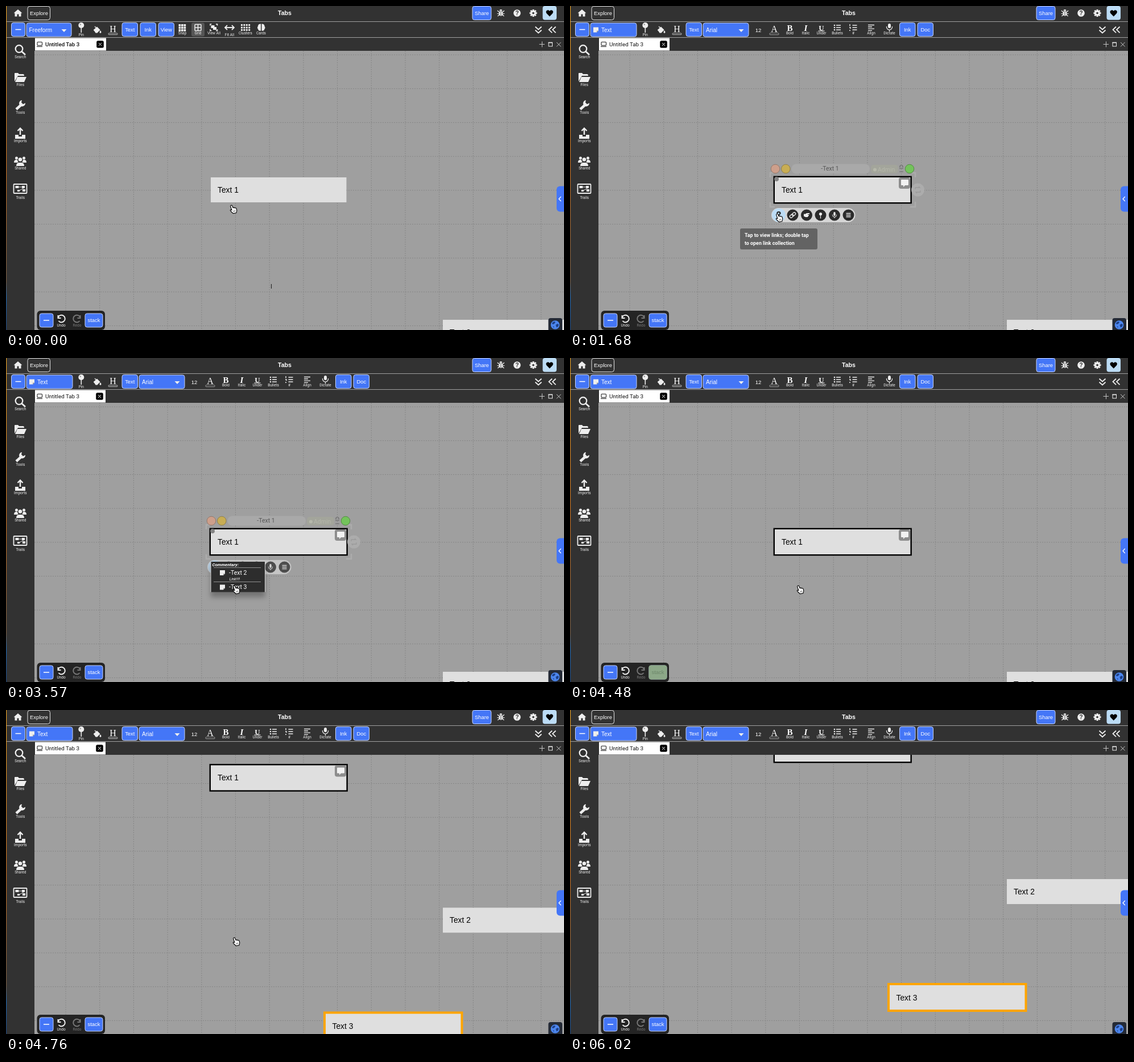
These frames come from a looping animation (981 px wide and 571 px high, 6930 ms). An HTML page:

```html
<!DOCTYPE html>
<html lang="en">
<head>
<meta charset="utf-8">
<title>Linked notes</title>
<style>
html, body { margin: 0; width: 100%; height: 100%; overflow: hidden; background: #323232; }
svg { display: block; width: 981px; height: 571px; }
text { font-family: "Liberation Sans", Arial, sans-serif; fill: #fff; }
.ro { font-family: Roboto, sans-serif; }
.se { font-family: "Liberation Serif", serif; }
.mid { text-anchor: middle; }
.b { font-weight: 700; }
.m { font-weight: 500; }
.i { font-style: italic; }
.line { fill: none; stroke: #eee; stroke-width: 1.6; }
.lifted { filter: drop-shadow(0 9px 4px rgba(0, 0, 0, .28)); }
.faded { opacity: .7; }
</style>
</head>
<body>
<svg id="stage" viewBox="0 0 981 571"></svg>
<script>
const LOOP = 6930, TICK = 70, CELL = 59.7, SCROLL = 255;
const BLUE = '#4476f7', DARK = '#323232', PALE = '#bcdcf5', INK = '#eee', RIM = 'stroke="#c6d3fa"';

const rect = (x, y, w, h, r, fill, more = '') =>
  `<rect x="${x}" y="${y}" width="${w}" height="${h}" rx="${r}" fill="${fill}" ${more}/>`;
const dot = (x, y, r, fill, more = '') => `<circle cx="${x}" cy="${y}" r="${r}" fill="${fill}" ${more}/>`;
const path = (d, more = `fill="${INK}"`) => `<path d="${d}" ${more}/>`;
const line = (d, w = 1.6, color = INK) => `<path class="line" d="${d}" style="stroke:${color};stroke-width:${w}"/>`;
const text = (x, y, s, size, cls = '', fill = '#fff') =>
  `<text x="${x}" y="${y}" class="${cls}" style="font-size:${size}px;fill:${fill}">${s}</text>`;
const at = (x, y, body) => `<g transform="translate(${x} ${y})">${body}</g>`;
const styled = (cls, body) => `<g class="${cls}">${body}</g>`;
const during = (from, to, body) => `<g data-on="${from},${to}">${body}</g>`;
const label = (x, y, s, fill = INK) => text(x, y, s, 6.5, 'ro mid', fill);
const range = n => [...Array(n).keys()];
const button = (x, y, w, h, s) =>
  rect(x + .5, y + .5, w - 1, h - 1, 3.5, BLUE, RIM) + text(x + w / 2, y + h / 2 + 3.2, s, 9.4, 'mid');
const minus = (x, y) => button(x, y, 25, 25, '') + line(`M${x + 7.5} ${y + 12.5}h10`, 1.5, '#fff');
const select = (x, w, s, tx, caret) => rect(x, 30, w, 24, 3.5, BLUE, RIM) +
  text(tx, 46, s, 10) + (caret ? path(`M${caret - 4.5} 41h9l-4.500 5z`) : '');
const note = (x, y) => at(x, y, path('M-4.500-4.500h9v6l-3 3h-6z') + path('M4.500 1.500l-3 3v-3z', 'fill="#999"'));
const squares = (x, y, cols, rows, step, size) => range(cols * rows).map(k =>
  rect(x + k % cols * step, y + Math.floor(k / cols) * step, size, size, .5, INK)).join('');

// Workspace
function grid() {
  const dash = 'stroke="#868686" stroke-width="1" stroke-dasharray="2 2"';
  const rows = range(11).map(k => `<path d="M50 ${86 + (k - 1) * CELL}H981" ${dash}/>`).join('');
  const cols = range(15).map(k => `<path d="M${105 + k * CELL} 79V571" ${dash}/>`).join('');
  return `<g id="rows">${rows}</g>${cols}`;
}
const card = (x, y, s) => rect(x, y, 238.5, 44, 0, '#dfdfdf') + text(x + 12, y + 27, s, 13.8, '', '#000');
const frame = (x, y, pad, color, w) =>
  rect(x - pad, y - pad, 238.5 + 2 * pad, 44 + 2 * pad, 0, 'none', `stroke="${color}" stroke-width="${w}"`);

const cards = `<g id="cards">` +
  card(360, 302, 'Text 1') +
  during(210, 770, frame(360, 302, 1.2, BLUE, 2.4)) +
  during(770, LOOP, frame(360, 302, 1.2, '#000', 2.4) +
    rect(578, 302, 20, 20, 4, '#8d8d8d') +
    path('M583 306h11q1 0 1 1v8q0 1-1 1h-5l-3 3v-3h-3q-1 0-1-1v-8q0-1 1-1z', 'fill="#f2f2f2"')) +
  card(768, 553, 'Text 2') +
  during(210, 1120, frame(768, 553, 2.2, '#a9d2e6', 4)) +
  card(561.5, 739.5, 'Text 3') +
  during(4550, LOOP, frame(561.5, 739.5, 1.5, '#ffa500', 4)) + `</g>`;

const badge = dot(366, 352, 6.5, PALE) + text(366, 356, '2', 11.5, 'mid', '#000');

const tools = () => {
  const spots = [391.5, 416, 440.5, 465, 489.5];
  const glyphs = [
    `<g transform="rotate(-40)">${rect(-6, -2.2, 7, 4.4, 2.2, 'none', `stroke="${INK}" stroke-width="1.300"`)}${rect(-1, -2.2, 7, 4.4, 2.2, 'none', `stroke="${INK}" stroke-width="1.300"`)}</g>`,
    path('M-5-2h3l2-1.500h5v2h-3v1h2v1.500h-1v1.500h-1v1h-4l-3-1.500z'),
    dot(0, -2, 2.6, INK) + line('M0 0v6', 1.2),
    rect(-1.7, -5.5, 3.4, 7, 1.7, INK) + line('M-3.500-1v1a3.500 3.500 0 0 0 7 0v-1M0 3.500v2', 1),
    line('M-4-3h8M-4 0h8M-4 3h8', 1.4)
  ];
  return rect(354, 356, 147.5, 25, 12.5, '#d6d6d6') + dot(367, 368.5, 12, PALE) +
    text(367, 374, '?', 17, 'ro b mid', '#222') +
    spots.map((x, k) => dot(x, 368.5, 10, '#2b2b2b') + at(x, 368.5, glyphs[k])).join('');
};

const decor = line('M352 302v-8h8M598 294h9v8M352 346v8h8M598 354h9v-9', 2.5, '#acacac') +
  dot(361, 287, 7.8, '#cd9f8b', 'stroke="#94796c"') +
  dot(379.3, 287, 7.8, '#c8ad54', 'stroke="#90804c"') +
  rect(389.5, 278.5, 137.5, 17, 8, '#a9a9a9') + text(457, 290, '-Text 1', 10.5, 'ro mid', '#555') +
  rect(529, 280, 48, 15, 5, '#a3a59b') + dot(536, 288.5, 3, '#b6b8ab') +
  text(541, 291.5, 'Admin', 10.5, 'ro', '#b6b8ab') +
  line('M580 285v-2a2.500 2.500 0 0 1 5 0v2M579 286.500h7M579 292h7', 1.2, '#6c6c6c') +
  dot(597, 287, 7.8, '#73c35b', 'stroke="#568c46"') +
  dot(611.5, 324, 11.5, '#acacac') + line('M607 323v-3h8l-2-2M616 325v3h-8l2 2', 1.3, '#9b9b9b') +
  dot(363, 305, 4, '#858585');

const tip = rect(299, 392, 136, 37, 3, '#636363') +
  text(307, 407, 'Tap to view links; double tap', 8.9, 'ro b') +
  text(307, 420.5, 'to open link collection', 8.9, 'ro b');

const menu = styled('lifted', rect(360, 359, 95.5, 53.5, 0, '#2d2d2d')) +
  line('M360 359v53.500M455.500 359v53.500', 1, '#d4d4d4') +
  text(362.5, 367, 'Commentary:', 7.9, 'ro b i') + line('M365 369.500h83M365 394.500h83', .8, '#aaa') +
  note(380.5, 378.5) + text(392, 381.5, '-Text 2', 10.5, 'ro') +
  text(402, 392, 'Link!!!!', 6.6, 'ro i mid') +
  note(380.5, 404) + text(392, 406.5, '-Text 3', 10.5, 'ro');

// Application chrome
const gear = range(8).map(k => `<rect x="-1.500" y="-6.500" width="3" height="4" fill="${INK}" transform="rotate(${k * 45})"/>`).join('') +
  dot(0, 0, 4.7, INK) + dot(0, 0, 1.8, DARK);
const bug = rect(-3.2, -3, 6.4, 8.5, 3.2, INK) + path('M-2.500-3.500a2.500 2.500 0 0 1 5 0z') +
  line('M-6-4l3 3M6-4l-3 3M-6.500 1.500h13M-5.500 6l3-3M5.500 6l-3-3', 1.2) + line('M0-2v7', .8, DARK);

const topBar = rect(0, 0, 981, 79, 0, DARK) +
  line('M0 27.500H981M0 55.500H981', 1, '#a0a0a0') +
  path('M21 6l7.500 6.500h-2v6h-4v-4h-3v4h-4v-6h-2z') +
  rect(38, .5, 39.5, 24, 4, 'none', 'stroke="#e6e6e6"') + text(58, 15.5, 'Explore', 9.4, 'mid') +
  text(490, 16, 'Tabs', 10.6, 'b mid') + button(819.5, 0, 34, 25, 'Share') +
  at(870, 12, bug) + dot(898.5, 12.5, 6.3, INK) + text(898.5, 16, '?', 10, 'b mid', DARK) +
  at(927, 12.5, gear) + rect(943.5, 0, 24.5, 24.5, 4, PALE) +
  path('M955.700 18.500l-5.300-5.500c-3-4 2.500-8 5.300-4c2.800-4 8.300 0 5.300 4z', 'fill="#000"') +
  line('M930.500 36.500l5.500 5 5.500-5M930.500 42.500l5.500 5 5.500-5M960 36.500l-5.500 5.300 5.500 5.300M966.500 36.500l-5.500 5.300 5.500 5.300', 1.8);

const common = minus(9, 29) + dot(132.3, 34, 5, INK) + dot(130.8, 32.5, 1.2, '#999') + line('M132.300 38v9', 1.6) + label(132.3, 53, 'Pin') +
  path('M154 42l6-5.500 5.500 5.500-5 5.500h-3z') + line('M156 36l4 4M154 42.500h11', 1.3) + path('M166 43q3 4 0 5q-3-1 0-5z') +
  text(188, 46, 'H', 16, 'se mid') + rect(180, 48, 16, 2.5, 1, 'none', 'stroke="#ddd" stroke-width=".8"') +
  button(203.5, 29, 28.5, 25, 'Text');

const boardBar = select(36, 79, 'Freeform', 40.5, 102) + button(235.5, 29, 28.5, 25, 'Ink') + button(267.5, 29, 28.5, 25, 'View') +
  squares(303.5, 32, 3, 3, 4.5, 3.7) + label(310, 50, 'Snap') +
  rect(326, 29.5, 23, 24, 3, '#565656') + rect(332, 32.5, 11, 11, 1, 'none', `stroke="${INK}" stroke-width="1.500"`) +
  line('M337.500 32v12M332 38h11', 1.5) + label(337.5, 50, 'Grid') +
  line('M359 34.500v-2.500h2.500M369 32h2.500v2.500M371.500 41v2.500h-2.500M361.500 43.500h-2.500v-2.500', 1.6) + rect(360.5, 34, 6, 5, 0, INK) + rect(364, 37, 6, 5, 0, INK) + label(365.5, 50, 'View All') +
  line('M386 38h14M389 34l-4 4 4 4M397 34l4 4-4 4', 1.8) + label(393, 52.5, 'Fit All') +
  squares(413, 32, 4, 3, 4.4, 3) + label(421, 50, 'Clusters') +
  path('M448 31.500q-5 0-5 4q-2 3 0 5q1 4 5 3zM449.500 31.500q5 0 5 4q2 3 0 5q-1 4-5 3z') + label(448.5, 50, 'Cards');

const rows = (x, widths) => line(widths.map((w, k) => `M${x} ${33.5 + k * 3.3}h${w}`).join(''), 1.4);
const textBar = select(36, 81, 'Text', 55, 0) + note(45.5, 42) + select(234, 80, 'Arial', 239, 301) +
  text(331, 45.5, '12', 9.6, 'mid') + text(359, 46, 'A', 16, 'se mid') + rect(351, 48, 16, 2.5, 1, '#000', 'stroke="#ddd" stroke-width=".8"') +
  text(386.5, 43.5, 'B', 15, 'se b mid') + label(386.5, 50, 'Bold') +
  text(414.5, 43.5, 'I', 15, 'se b i mid') + label(414.5, 50, 'Italic') +
  text(442, 42.5, 'U', 13, 'se b mid') + line('M436.500 44h11', 1.2) + label(442, 50, 'Under') +
  range(3).map(k => dot(465, 34 + k * 4, 1.3, INK)).join('') + line('M468 34h8M468 38h8M468 42h8', 1.5) + label(470, 50, 'Bullets') +
  line('M492 32v3.500M491 38h2v2M491 43h2M496.500 34h8M496.500 38h8M496.500 42h8', 1.4) + label(498, 50, '#') +
  rows(524, [11, 7, 11, 7]) + label(529.5, 50, 'Align') +
  rect(559, 31, 5, 8, 2.5, INK) + line('M556.500 36v1a5 5 0 0 0 10 0v-1M561.500 42v3', 1.2) + label(561.5, 50, 'Dictate') +
  button(579, 29, 28.5, 25, 'Ink') + button(610.5, 29, 28.5, 25, 'Doc');

const tab = (w, weight) => rect(51, 56.5, w, 22, 0, '#fff') +
  rect(55, 63.5, 8.5, 6, 1, 'none', 'stroke="#222" stroke-width="1.100"') + line('M54 71.500h10', 1.1, '#222') +
  text(69, 71, 'Untitled Tab 3', 9.8, 'ro ' + weight, '#111') +
  at(51 + w - 10.5, 67.5, rect(-6.3, -6.3, 12.6, 12.6, 2.5, '#000') + line('M-2.500-2.500l5 5M2.500-2.500l-5 5', 1, '#fff'));

const people = dot(-6.5, -5, 2.5, INK) + dot(6.5, -5, 2.5, INK) + dot(0, -2.5, 3.3, INK) +
  path('M-11 3q0-5 4-5h2q1 4 2 4l-2 1zM11 3q0-5-4-5h-2q-1 4-2 4l2 1zM-7 9q0-6 5-6h4q5 0 5 6z');
const side = [
  ['Search', 77, 92, dot(-2, -1.5, 6.3, 'none', `stroke="${INK}" stroke-width="2.300"`) + line('M2.500 3l6.500 6', 2.8)],
  ['Files', 126, 141, path('M-10 7v-14q0-1 1-1h5l2 2h7q2 0 2 3h-11z') + path('M-9 8l4-9h16l-4 9z')],
  ['Tools', 175, 190, line('M-7 7L3-2', 4.5) + path('M9-4a5.500 5.500 0 1 1-6-5l-1 4 3 3z')],
  ['Imports', 224, 240, line('M0 3v-10M-4.500-4l4.500-4.500 4.500 4.500', 2.4) + path('M-9 3h6v3h6v-3h6v7h-18z')],
  ['Shared', 273, 288, people],
  ['Trails', 322, 340, rect(-11.5, -8, 23, 16, 1, 'none', `stroke="${INK}" stroke-width="1.800"`) +
    rect(-8.5, -5, 6, 4, 0, INK) + rect(3, -5, 5, 4, 0, INK) + rect(-5, 2, 4, 3, 0, INK) + rect(4, 1, 5, 4, 0, INK) + line('M-2-3h5M6-1l-7 4', .9)]
];
const sideBar = rect(0, 56, 50, 515, 0, DARK) +
  side.map(([s, y, base, icon]) => at(25, y, icon) + label(25.3, base, s)).join('') +
  rect(0, 0, 1.2, 571, 0, 'url(#edge)');

const turn = 'M-5.500-5v5h5M-5.500-1a6.300 6.300 0 1 1 1 6';
const globe = dot(0, 0, 7.8, '#4c86ee') +
  path('M-5.500-3.500l3.500-2.500 2.500 1-1.500 2.500-2.500 1.500-1.500-.5zM1 0l3-2 2.500 1.500-1.500 3.500-2.500 1.500-1-2.500zM-4 2l2 1-.5 2.500z', 'fill="#1d3f86"');
const bottom = rect(54.5, 537, 119.5, 34, 6, '#242424') + minus(58.5, 541.5) +
  at(97, 550, line(turn, 2)) + label(97, 565, 'Undo') +
  at(125, 550, `<g transform="scale(-1 1)">${line(turn, 2, '#777')}</g>`) + label(125, 565, 'Redo', '#777') +
  button(138.5, 541.5, 32, 25, 'stack') +
  during(4410, 4620, rect(138.5, 541.5, 32, 25, 4, '#8ca888') + text(154.5, 557.2, 'stack', 9.4, 'mid', '#6c8569')) +
  rect(953.5, 550, 24.5, 24, 4, '#242a36') + at(965.5, 562, globe) +
  rect(968, 317.5, 24, 45, 6, BLUE) + line('M975.700 336l-3.700 4 3.700 4', 1.3, '#fff');

const edge = '<defs><linearGradient id="edge" x2="0" y2="1"><stop stop-color="#d8951f"/><stop offset=".5" stop-color="#b8661c"/>' +
  '<stop offset=".85" stop-color="#6b5540"/><stop offset=".9" stop-color="#1d62a8"/><stop offset="1" stop-color="#1b3f70"/></linearGradient></defs>';

const beamPath = 'M-3-6.500q3 0 3 1.500q0-1.500 3-1.500M0-5v10M-3 6.500q3 0 3-1.500q0 1.500 3 1.500M-1.500 1.500h3';
const pointer = '<g id="pointer">' +
  `<circle id="ring" r="25.500" fill="none" stroke="#555" stroke-width="2"/>` +
  `<g id="hand">${path('M-4.500-6.500q1.500-1 2.300.7l1.200 3.300q1.300-1 2 .2q1.300-.9 2 .4q1.600-.6 2.100 1l.7 3.200l-.9 4.200l-5.400 1.100l-4-3.600q-2-2.300-.6-2.800q1.100-.3 2.200 1l-2.400-7.200q-.2-1 .8-1.500z', 'fill="#fff" stroke="#000" stroke-width="1.100"')}` +
  line('M0 2.500l.6 2.500M2.300 2l.5 2.500', .7, '#000') + '</g>' +
  `<g id="beam">${line(beamPath, 2.4, '#ddd')}${line(beamPath, 1.2, '#000')}</g></g>`;

const stage = document.getElementById('stage');
stage.innerHTML = edge + rect(50, 79, 931, 492, 0, '#9f9f9f') + grid() +
  during(0, 70, line('M466.500 490v8', 1.1, '#222')) + cards +
  during(210, 770, badge) + during(770, 4410, decor) + during(770, 2660, tools()) +
  `<g id="tip">${tip}</g>` + during(2660, 4410, styled('faded', tools()) + menu) +
  topBar + common + during(0, 770, boardBar) + during(770, LOOP, textBar) +
  during(0, 910, tab(125, 'm')) + during(910, LOOP, tab(124, '')) +
  line('M937.500 67.500h9.500M942.500 62.500v10M968 64l7.500 7.500M975.500 64l-7.500 7.500', 1, '#c4c4c4') +
  rect(954, 64.5, 6.5, 6.5, 0, 'none', `stroke="${INK}" stroke-width="1"`) + line('M953.500 64.500h7.500', 1.6) +
  sideBar + bottom + pointer;

// Motion: time, x, y
const route = [[0, 400, 358], [70, 400, 358], [420, 396, 340], [840, 396, 340], [1540, 368, 373],
  [2450, 368, 373], [2590, 366, 367], [2940, 366, 367], [3150, 371, 379], [3570, 405, 408], [5600, 405, 408], [6020, 466, 588]];
const clicks = [[560, 700], [2100, 2240], [4270, 4410]];
const part = id => document.getElementById(id);
const [list, rowLines, tipBox, mouse, ring, hand, beam] =
  ['cards', 'rows', 'tip', 'pointer', 'ring', 'hand', 'beam'].map(part);
const timed = [...stage.querySelectorAll('[data-on]')].map(el => [el, ...el.dataset.on.split(',').map(Number)]);
const show = (el, on) => { el.style.display = on ? '' : 'none'; };
const clamp = v => Math.max(0, Math.min(1, v));

// Same curve as the CSS keyword "ease"
function ease(p) {
  let lo = 0, hi = 1;
  for (let k = 0; k < 20; k++) {
    const u = (lo + hi) / 2, x = .75 * u * (1 - u) + u ** 3;
    if (x < p) lo = u; else hi = u;
  }
  return .3 * lo * (1 - lo) ** 2 + 3 * lo * lo * (1 - lo) + lo ** 3;
}

function place(t) {
  const k = route.findIndex(r => r[0] > t);
  if (k < 0) return route[route.length - 1].slice(1);
  const [t0, x0, y0] = route[k - 1], [t1, x1, y1] = route[k];
  const p = (t - t0) / (t1 - t0), e = p * p * (3 - 2 * p);
  return [x0 + (x1 - x0) * e, y0 + (y1 - y0) * e];
}

function draw(t) {
  for (const [el, from, to] of timed) show(el, t >= from && t < to);
  list.setAttribute('transform', `translate(0 ${-SCROLL * ease(clamp((t - 4510) / 500))})`);
  rowLines.setAttribute('transform', `translate(0 ${t >= 4550 ? 5 * CELL - SCROLL : 0})`);
  show(tipBox, t >= 1610 && t < 2590);
  tipBox.style.opacity = t < 1680 ? .6 : 1;
  const [x, y] = place(t);
  mouse.setAttribute('transform', `translate(${x} ${y})`);
  const overText = (t < 1500 && y < 347) || (t >= 2660 && t < 3010);
  show(beam, overText);
  show(hand, !overText);
  show(ring, clicks.some(([from, to]) => t >= from && t < to));
}

const start = performance.now();
function tick() {
  const t = (performance.now() - start) % LOOP;
  draw(Math.floor(t / TICK) * TICK);
  requestAnimationFrame(tick);
}
tick();
</script>
</body>
</html>
```
